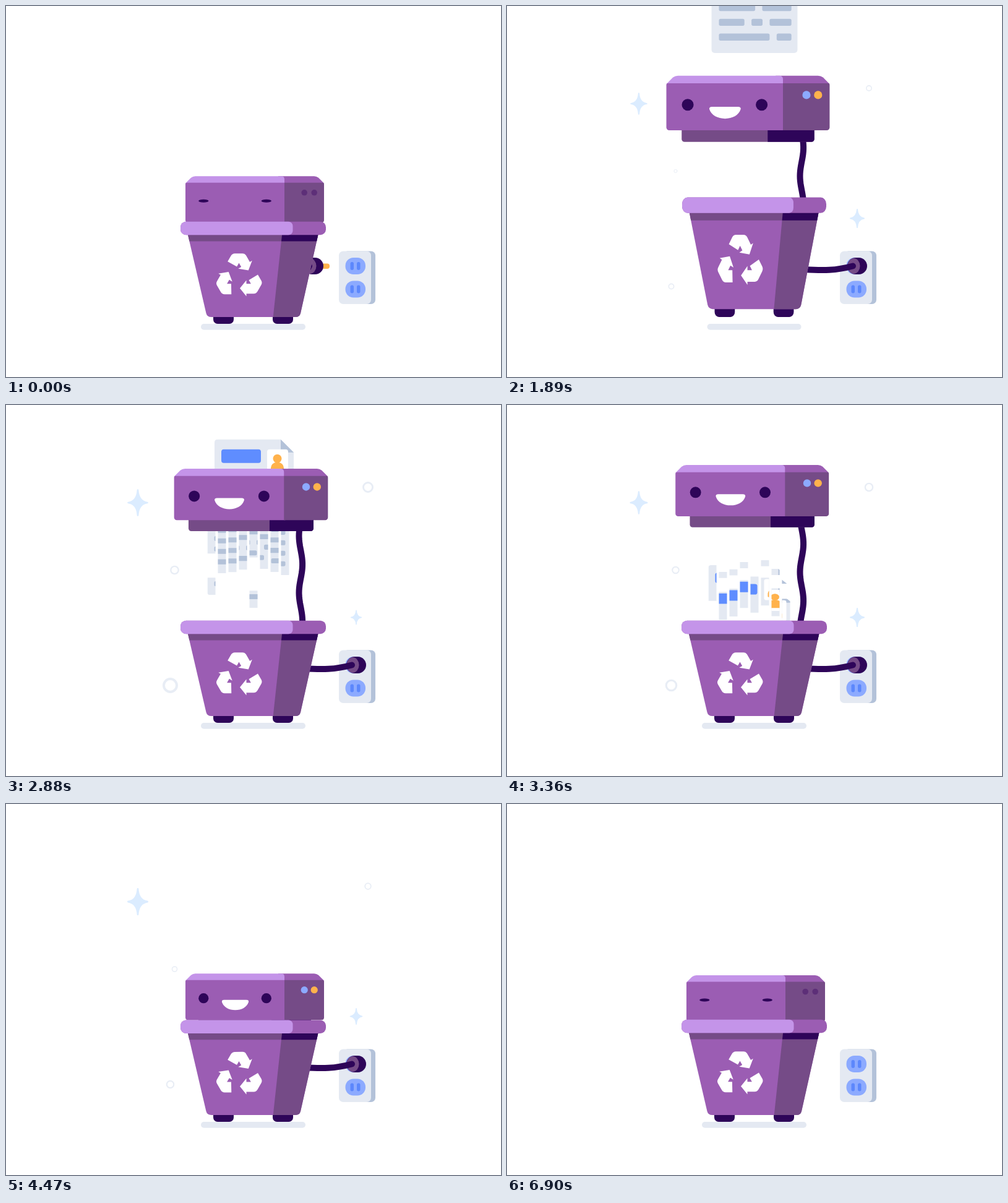
Write an HTML page with a canvas that moves like this. It is 800 px wide and 600 px high and loops after 8.04 s.

```html
<!DOCTYPE html>
<html lang="en">
<head>
<meta charset="utf-8">
<title>Paper shredder</title>
<style>
  html, body { margin: 0; width: 100%; height: 100%; overflow: hidden; background: #fff; }
  canvas { display: block; width: 800px; height: 600px; }
</style>
</head>
<body>
<canvas id="stage" width="800" height="600"></canvas>
<script>
const LOOP = 8040;
const ctx = document.getElementById('stage').getContext('2d');

const LIGHT = '#c494e9', BODY = '#9b5db3', SIDE = '#754b87', DARK = '#2e0559';
const PALE = '#e4e9f2', GREY = '#b3c2d9', BLUE = '#8caaff', DEEP = '#5c87fc';
const ORANGE = '#ffb24c', STAR = '#dbecff', RING = '#e8edf5';

// Moments of the story, in ms
const WAKE = 600, JUMP = 1640, SHRED = 2525, DROP = 3800, LAND = 4320, UNPLUG = 4850, SLEEP = 5000;

// Easing

const both = p => (1 - Math.cos(Math.PI * p)) / 2;
const speedUp = p => p * p;
const slowDown = p => 1 - (1 - p) ** 2;
const overshoot = p => 1 + 1.6 * (p - 1) ** 3 + 0.6 * (p - 1) ** 2;

const ramp = (t, from, to, ease = both) => ease(Math.min(1, Math.max(0, (t - from) / (to - from))));
const bump = (t, from, to) => Math.sin(Math.PI * ramp(t, from, to, p => p)) ** 2;
const during = (t, on, off, fade = 180) =>
  ramp(t, on, on + fade, overshoot) - ramp(t, off, off + fade);
const random = n => Math.abs(Math.sin(n * 12.9898) * 43758.5453) % 1;

// Drawing

function box(x, y, w, h, r, color) {
  ctx.fillStyle = color;
  ctx.beginPath();
  ctx.roundRect(x, y, w, h, r);
  ctx.fill();
}

function oval(x, y, rx, ry, color) {
  ctx.fillStyle = color;
  ctx.beginPath();
  ctx.ellipse(x, y, Math.max(0, rx), Math.max(0, ry), 0, 0, 2 * Math.PI);
  ctx.fill();
}

function shape(d, color) {
  ctx.fillStyle = color;
  ctx.fill(new Path2D(d));
}

function layer(draw) {
  ctx.save();
  draw();
  ctx.restore();
}

function cable(d) {
  ctx.strokeStyle = DARK;
  ctx.lineWidth = 10;
  ctx.lineCap = 'round';
  ctx.stroke(d);
}

// Twinkles

const pulse = (t, peak, period, low, high) =>
  low + (high - low) * (1 + Math.cos(2 * Math.PI * (t - peak) / period)) / 2;

function star(x, y, hw) {
  if (hw < 0.3) return;
  layer(() => {
    ctx.translate(x, y);
    ctx.scale(hw / 17, hw / 17);
    const d = new Path2D('M0-20.7Q1.2-2 15.7 0Q1.2 2 0 20.7Q-1.2 2-15.7 0Q-1.2-2 0-20.7Z');
    ctx.fillStyle = ctx.strokeStyle = STAR;
    ctx.lineWidth = 2.8;
    ctx.lineJoin = 'round';
    ctx.fill(d);
    ctx.stroke(d);
  });
}

function ring(x, y, r) {
  if (r < 0.3) return;
  ctx.strokeStyle = RING;
  ctx.lineWidth = r * 0.32;
  ctx.beginPath();
  ctx.arc(x, y, r * 0.84, 0, 2 * Math.PI);
  ctx.stroke();
}

function twinkles(t) {
  star(213, 158, pulse(t, 1450, 1540, 11.5, 17) * during(t, 520, 6050, 400));
  star(566, 343.5, pulse(t, 1890, 1450, 8, 12) * during(t, 700, 6500, 400));
  ring(585, 133, pulse(t, 2850, 2400, 4.5, 9) * during(t, 600, 5950, 400));
  ring(272.5, 267, pulse(t, 3000, 2050, 3, 7.5) * during(t, 700, 6050, 400));
  ring(265.5, 453.5, pulse(t, 2900, 2320, 4.6, 12.5) * during(t, 800, 6100, 400));
}

// Power

function outlet() {
  box(545, 396.5, 52, 85.5, 7, GREY);
  box(538, 396.5, 52, 85.5, 7, PALE);
  for (const y of [420.5, 458]) {
    box(548.5, y - 13.5, 32.5, 27, 13, BLUE);
    for (const x of [556.5, 567]) box(x, y - 6.5, 5.5, 13, 2.7, DEEP);
  }
}

function plug(t) {
  const dx = -69 * (1 - ramp(t, 0, 450, overshoot)) - 112 * ramp(t, UNPLUG, UNPLUG + 320, speedUp);
  if (dx <= -111) return;
  const prong = Math.min(10, -8 - dx);
  if (prong > 0) box(576 + dx, 416.5, 6 + prong, 8.5, 4, ORANGE);
  box(550 + dx, 407, 32, 27, 13.5, DARK);
  oval(560.5 + dx, 420.5, 10, 12.5, SIDE);
  const span = 79 + dx;
  cable(new Path2D(`M480 426C${480 + span * 0.4} 428 ${480 + span * 0.65} 428 ${480 + span} 420.5`));
}

// Paper: text lines are one full bar, split by gaps

const PAPER_H = 170;
const GAPS = [[91.5], [54, 81], [70]];

function textLine(y, gaps) {
  let x = 11;
  for (const gap of [...gaps, 124]) {
    box(x, y, gap - 5 - x, 10.5, 2.5, GREY);
    x = gap + 5.5;
  }
}

function paper() {
  shape(`M5 0H107L128 21V${PAPER_H - 5}q0 5-5 5H5q-5 0-5-5V5Q0 0 5 0Z`, PALE);
  shape('M107 0L128 21H110Q107 21 107 18Z', GREY);
  box(11, 16, 64, 22, 4, '#5f8dff');
  box(85, 16, 34, 44, 4, '#fff');
  oval(101.5, 31, 7, 7, ORANGE);
  box(91, 37, 21, 17, [9, 9, 2, 2], ORANGE);
  for (let k = 0; k < 4; k++) textLine(141 - 22 * k, GAPS[k % 3]);
}

function sheet(t, head) {
  if (t < 1080 || t > 3200) return;
  const bottom = -6 + 79 * ramp(t, 1080, 1400, slowDown) + 3 * ramp(t, 1410, 1890)
    + 0.192 * Math.max(0, t - 2100);
  const scale = 1 + 0.085 * bump(t, 1250, 2530);
  layer(() => {
    ctx.beginPath();
    ctx.rect(0, 0, 800, head.y + 40 * head.s);
    ctx.clip();
    ctx.translate(400 + ramp(t, 1900, 2300), bottom);
    ctx.scale(scale, scale);
    ctx.translate(-64, -PAPER_H);
    paper();
  });
}

// Strips show slices of the sheet, bottom first, and drop piece by piece

const FEED = 0.2, SQUEEZE = 0.77, TOTAL = PAPER_H * SQUEEZE;

function piece(i, from, to, out, base) {
  const end = Math.min(out, to), fall = Math.max(0, out - to) / FEED;
  const bottom = base + end - from + FEED * fall + 0.0012 * fall * fall;
  if (end <= from || bottom > 480) return;
  const x = 325.5 + 17 * i;
  layer(() => {
    ctx.beginPath();
    ctx.rect(x, bottom - (end - from), 13, end - from);
    ctx.clip();
    ctx.translate(x - 16 * i, bottom + from - TOTAL);
    ctx.scale(1, SQUEEZE);
    paper();
  });
}

function strips(t) {
  if (t < SHRED || t > DROP) return;
  for (let i = 0; i < 8; i++) {
    const out = (t - SHRED - 110 * random(i + 3) ** 2) * FEED;
    const first = i % 4 ? 76 : 28;
    const cuts = [0, first, Math.min(first + 45, TOTAL), TOTAL];
    for (let k = 0; k < 3; k++) piece(i, cuts[k], cuts[k + 1], out, 204);
  }
}

// Head

function headPose(t) {
  const s = 1 + 0.11 * (ramp(t, JUMP, JUMP + 250) - ramp(t, 3300, 3850)) + 0.068 * bump(t, 1680, 2100);
  const cx = 402 - 2 * (ramp(t, 0, 900) - ramp(t, 3900, LAND)) - 332 * (s - 1) ** 2;
  const y = 275.3 + 9 * bump(t, 1500, 1740)
    - 172.3 * ramp(t, JUMP, JUMP + 510, overshoot)
    - 6 * bump(t, 3150, 3600)
    + 7 * ramp(t, 3500, DROP) + 167 * ramp(t, DROP, LAND, speedUp)
    - 4 * bump(t, LAND, LAND + 220);
  return { x: cx - 112 * s, y, s };
}

function lamp(t, x, color, delay) {
  const on = 500 + delay, off = 5240 + delay;
  const open = during(t, on, off + 100, 100) + 0.8 * (bump(t, on, on + 220) + bump(t, off, off + 200));
  oval(x, 26.5, 4.8, 4.8, '#5d2f78');
  oval(x, 26.5, 5.6, 5.6 * open, color);
}

function face(t) {
  const eye = 0.31 + 0.69 * during(t, WAKE, SLEEP);
  const smile = during(t, WAKE + 220, SLEEP - 50);
  for (const x of [29.3, 130.8]) oval(x, 40, 8.1, 8.1 * eye, DARK);
  if (smile > 0.02) layer(() => {
    ctx.translate(80.5, 48);
    ctx.scale(smile, smile);
    shape('M-18-5.3H18Q22-5.3 21.5-2C19 6.5 10 11 0 11S-19 6.5-21.5-2Q-22-5.3-18-5.3Z', '#fff');
  });
  lamp(t, 192.2, BLUE, 0);
  lamp(t, 208.2, ORANGE, 130);
}

function headCable(t, head) {
  if (head.y > 255) return;
  const crest = 275 + 0.122 * (t - 1890);
  const d = new Path2D();
  for (let y = head.y + 80 * head.s; y < 380; y += 4)
    d.lineTo(476.3 - 2.8 * Math.cos(2 * Math.PI * (y - crest) / 92), y);
  cable(d);
}

function drawHead(t, head) {
  layer(() => {
    ctx.translate(head.x, head.y);
    ctx.scale(head.s, head.s);
    box(21, 70, 182, 21, [0, 0, 4, 4], SIDE);
    box(139, 70, 64, 21, [0, 0, 4, 0], DARK);
    shape('M150 0H208Q212 0 215 2.5L224 11.5H150Z', BODY);
    shape('M0 11.5L9 2.5Q12 0 16 0H155Q160 0 160 5V11.5Z', LIGHT);
    box(0, 10.5, 162, 64.5, [2, 0, 0, 4], BODY);
    box(160, 10.5, 64, 64.5, [0, 2, 4, 0], SIDE);
    face(t);
  });
}

// Bin

function arrows() {
  const arrow = 'M1.5 18.5L12 5.5V11.2H19.4L16 5.3L30.5-3.5L36 6Q38 9.5 36 13L30 23.5Q28 27.2 24 27.2H12V31.5Z';
  ctx.translate(376.5, 438);
  for (let k = 0; k < 3; k++) {
    shape(arrow, '#fff');
    ctx.rotate(2 * Math.PI / 3);
  }
}

function bucket() {
  ctx.clip(new Path2D('M293 366H505.3L476 497Q474.5 503 468 503H332Q325 503 323.5 497Z'));
  box(290, 366, 220, 140, 0, BODY);
  box(290, 366, 220, 14.5, 0, SIDE);
  shape('M446.5 366H510V505H431.5Z', SIDE);
  shape('M446.5 366H510V380.5H445Z', DARK);
}

function drawBin(t) {
  const hop = bump(t, 1740, 2040);
  const sy = 1 + 0.17 * hop - 0.06 * bump(t, 1500, 1740) - 0.04 * bump(t, 2040, 2260)
    - 0.02 * bump(t, LAND, LAND + 180);
  layer(() => {
    ctx.translate(399.5, 514 - 11 * hop);
    ctx.scale(1 - (sy - 1) * 0.05, sy);
    ctx.translate(-399.5, -514);
    for (const x of [335, 431]) box(x, 500, 33, 14, [0, 0, 7, 7], DARK);
    layer(bucket);
    layer(arrows);
    box(282, 348.7, 235, 21.5, 9, BODY);
    box(282, 348.7, 181.5, 21.5, [9, 7, 7, 9], LIGHT);
  });
}

function shadow(t) {
  const half = 84.5 - 8.5 * bump(t, 1740, 2040);
  box(399.5 - half, 514, 2 * half, 9.7, 4.8, PALE);
}

function draw(t) {
  ctx.fillStyle = '#fff';
  ctx.fillRect(0, 0, 800, 600);
  const head = headPose(t);
  shadow(t);
  outlet();
  twinkles(t);
  plug(t);
  headCable(t, head);
  strips(t);
  sheet(t, head);
  drawHead(t, head);
  drawBin(t);
}

let start;
function tick(now) {
  start ??= now;
  draw((now - start) % LOOP);
  requestAnimationFrame(tick);
}
draw(0);
requestAnimationFrame(tick);
</script>
</body>
</html>
```
